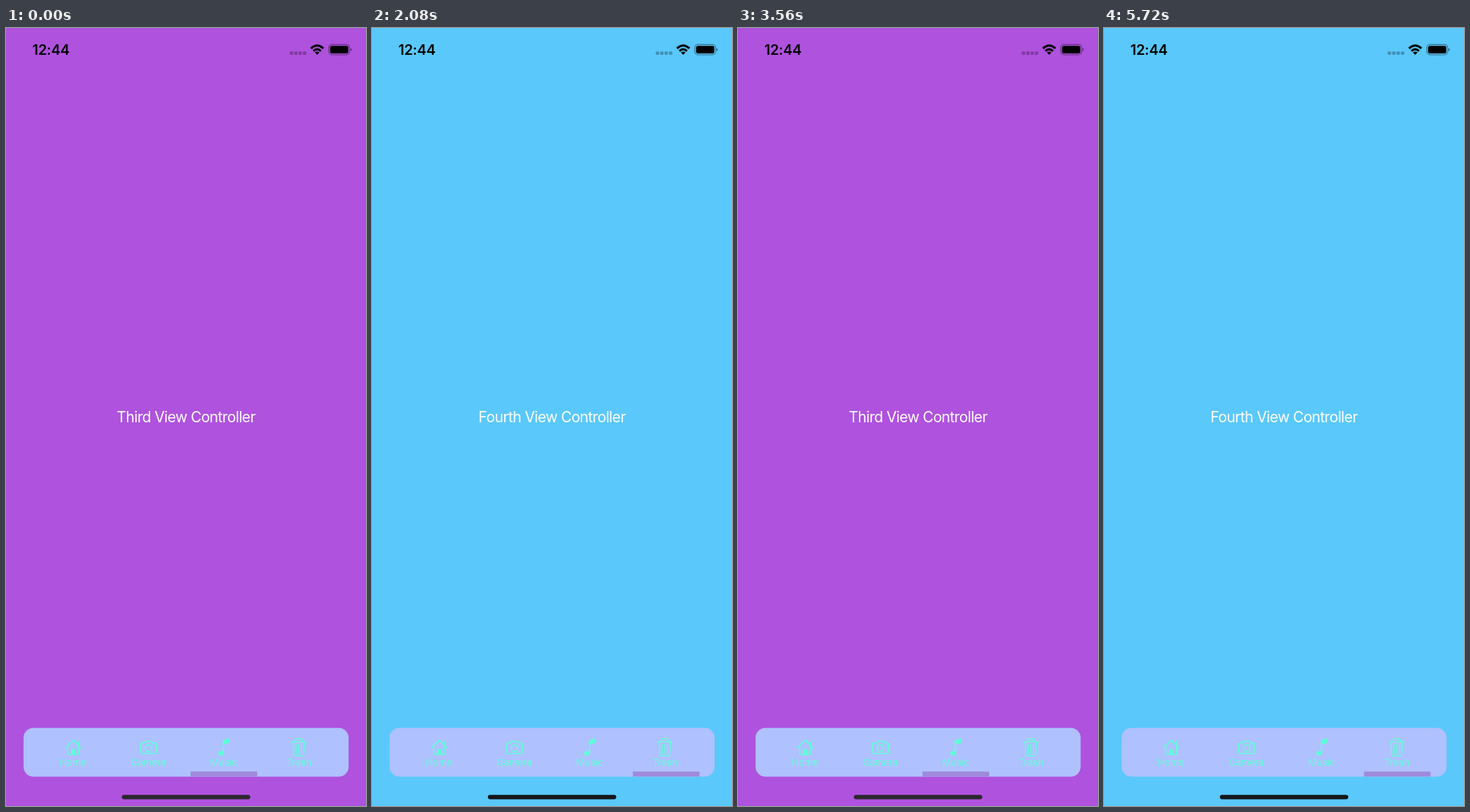
Recreate the animation shown at these times as an HTML page. Size 509 by 1101 pixels, loop 5.76 s.

```html
<!DOCTYPE html>
<html lang="en">
<head>
<meta charset="utf-8">
<title>Tab bar</title>
<style>
  html, body { margin: 0; width: 100%; height: 100%; overflow: hidden; }
  svg { display: block; width: 509px; height: 1101px; }
  text { font-family: Inter, "Liberation Sans", sans-serif; text-anchor: middle; }
  #title { font-size: 20.9px; letter-spacing: -.6px; fill: #fff; }
  .clock { font-size: 20px; font-weight: 600; letter-spacing: -.3px; }
  .tabs text { font-size: 13.5px; fill: #5effd6; }
  .line { fill: none; stroke: #5effd6; stroke-width: 1.6; stroke-linecap: round; stroke-linejoin: round; }
  .solid { fill: #5effd6; }
</style>
</head>
<body>
<svg viewBox="0 0 509 1101">
  <rect id="screen" width="509" height="1101"/>
  <text id="title" x="254.5" y="558"></text>

  <text class="clock" x="63.5" y="37.7">12:44</text>
  <g opacity=".27">
    <rect x="401.2" y="33.2" width="4.8" height="4.8" rx="1.2"/>
    <rect x="407.4" y="33.2" width="4.8" height="4.8" rx="1.2"/>
    <rect x="413.6" y="33.2" width="4.8" height="4.8" rx="1.2"/>
    <rect x="419.8" y="33.2" width="4.8" height="4.8" rx="1.2"/>
  </g>
  <g fill="none" stroke="#000" stroke-width="3">
    <path d="M431.2 28.8Q440 20.6 448.8 28.8"/>
    <path d="M434.6 32.6Q440 27.6 445.4 32.6"/>
  </g>
  <path d="M436.8 34.8Q440 32 443.2 34.8L440 38Z"/>
  <rect x="456.4" y="23.4" width="29.4" height="14.4" rx="4.4" fill="none" stroke="#000" stroke-opacity=".42" stroke-width="1.2"/>
  <rect x="458.2" y="25.2" width="25.8" height="10.8" rx="2.8"/>
  <path d="M487 28.2Q488.8 29 488.8 30.6T487 33Z" opacity=".45"/>

  <rect x="24.8" y="990.5" width="459.6" height="69" rx="14" fill="#afc1ff"/>
  <rect id="marker" y="1052.3" width="94.2" height="7" fill="#9f8adb"/>
  <g class="tabs">
    <g class="line">
      <path d="M84 1019L94.2 1008.6Q95 1007.9 95.8 1008.6L106 1019M87.3 1016.5V1026.3Q87.3 1028 89 1028H101.2Q102.9 1028 102.9 1026.3V1016.5M102.6 1009.5V1014.5"/>
      <path d="M193 1011.8H195.4L197 1009.6H206L207.6 1011.8H210.2Q212.6 1011.8 212.6 1014.2V1024.4Q212.6 1026.8 210.2 1026.8H192.8Q190.4 1026.8 190.4 1024.4V1014.2Q190.4 1011.8 192.8 1011.8Z"/>
      <circle cx="201.5" cy="1019.3" r="4.7"/>
      <path d="M404 1010.2H424M409.2 1010V1008Q409.2 1005.8 411.4 1005.8H416.6Q418.8 1005.8 418.8 1008V1010M406 1010.4L407 1028Q407.2 1030 409 1030H419Q420.8 1030 421 1028L422 1010.4"/>
      <path d="M410.2 1014L410.7 1026.6M414 1014V1026.6M417.8 1014L417.3 1026.6" stroke-width="1.3"/>
    </g>
    <g class="solid">
      <path d="M92 1028V1021.4Q92 1020.4 93 1020.4H97.2Q98.2 1020.4 98.2 1021.4V1028Z"/>
      <circle cx="208.8" cy="1015.2" r="1.2"/>
      <path d="M306.6 1009.4Q306.6 1007.8 308 1007.4L315 1005.6Q316.2 1005.4 316.2 1006.6V1010.6Q316.2 1011.8 315 1012.1L308.2 1013.8V1026.2H306.6Z"/>
      <ellipse cx="304.2" cy="1026.4" rx="4.1" ry="3.2" transform="rotate(-14 304.2 1026.4)"/>
    </g>
    <text x="94.7" y="1043.6">Home</text>
    <text x="201.3" y="1043.6">Camera</text>
    <text x="307.7" y="1043.6">Music</text>
    <text x="414.3" y="1043.6">Trash</text>
  </g>
  <rect id="grip" x="163.8" y="1085.2" width="181.6" height="6.2" rx="3.1"/>
</svg>
<script>
const LOOP = 5760, STEP = 40;

// name, background, home bar
const SCREENS = [
  ['First', '#ff9500', '#17130f'],
  ['Second', '#ff2d55', '#3a3339'],
  ['Third', '#af52de', '#2c2730'],
  ['Fourth', '#5ac8fa', '#14171a'],
];

// time of the switch, tab, head start of the marker's spring
const TAPS = [
  [0, 2, 1000],
  [800, 1, 57],
  [1720, 3, 50],
  [2440, 0, 44],
  [2960, 2, 45],
  [3760, 1, 45],
  [4480, 0, 45],
  [5200, 3, 45],
];

const $ = id => document.getElementById(id);
const screen = $('screen'), title = $('title'), marker = $('marker'), grip = $('grip');
const slot = tab => 47.6 + tab * 106.67;

// Underdamped spring that settles in half a second
function spring(ms) {
  const damping = 0.8, decay = 13.8;
  const root = Math.sqrt(1 - damping * damping);
  const s = ms / 1000, angle = decay / damping * root * s;
  return 1 - Math.exp(-decay * s) * (Math.cos(angle) + damping / root * Math.sin(angle));
}

function draw(t) {
  const i = TAPS.findLastIndex(tap => tap[0] <= t);
  const [at, tab, lead] = TAPS[i];
  const from = slot(TAPS[Math.max(i - 1, 0)][1]);
  const [name, back, bar] = SCREENS[tab];
  screen.setAttribute('fill', back);
  grip.setAttribute('fill', bar);
  title.textContent = name + ' View Controller';
  marker.setAttribute('x', from + (slot(tab) - from) * spring(t - at + lead));
}

const start = performance.now();
function tick() {
  const t = (performance.now() - start) % LOOP;
  draw(Math.floor(t / STEP) * STEP);
  requestAnimationFrame(tick);
}
draw(0);
requestAnimationFrame(tick);
</script>
</body>
</html>
```
